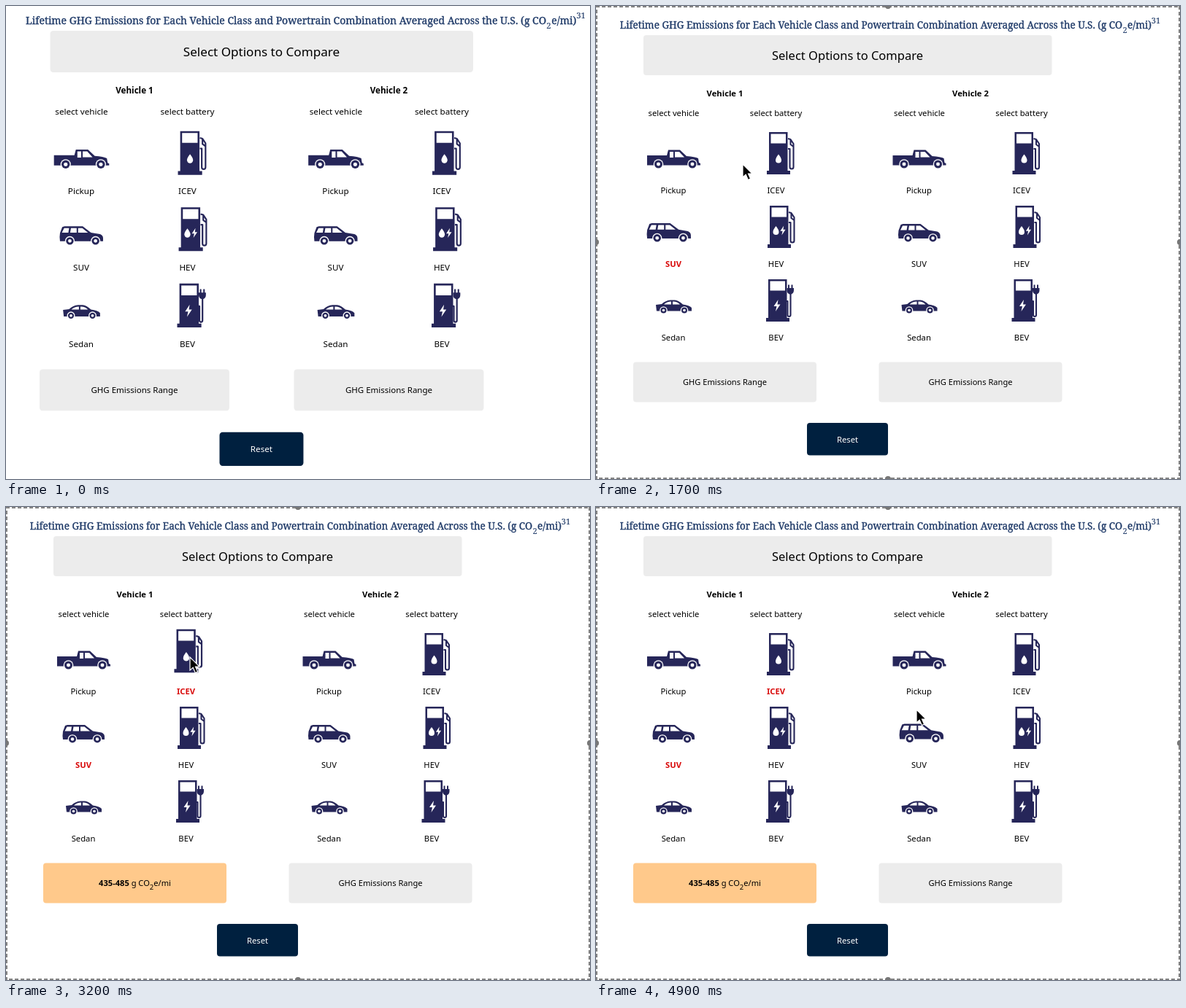
An HTML page that plays this animation: 800 px wide and 649 px high, repeating every 5 s.

```html
<!DOCTYPE html>
<html lang="en">
<head>
<meta charset="utf-8">
<title>Lifetime GHG Emissions</title>
<style>
html, body { margin: 0; width: 100%; height: 100%; overflow: hidden; background: #fff }
svg { display: block }
text { font: 11.25px "Noto Sans", "Open Sans", sans-serif; text-anchor: middle }
.title text { font: 500 13.53px "Noto Serif", serif; fill: #1f3a68; stroke: #1f3a68; stroke-width: .35 }
.title .small { font-size: 11px; stroke-width: .1 }
.heading { font-size: 16.5px }
.bold, .picked { font-weight: 700 }
.picked { fill: #d90b0b }
.range { font-size: 11.1px }
.icon { fill: #262659 }
.hole { fill: #fff }
.line { fill: none; stroke: #262659; stroke-width: 2.1; stroke-linejoin: round }
</style>
</head>
<body>
<svg id="stage" width="800" height="649" viewBox="0 0 800 649"></svg>
<script>
const stage = document.getElementById('stage');
const $ = id => document.getElementById(id);
const text = (x, y, s, cls = '', id = '') => `<text x="${x}" y="${y}" class="${cls}" id="${id}">${s}</text>`;
const box = (x, y, w, h, fill, id = '') =>
  `<rect x="${x}" y="${y}" width="${w}" height="${h}" rx="4" fill="${fill}" id="${id}"/>`;
const hole = d => `<path class="hole" d="${d}"/>`;
const wheel = (x, y, r) => `<circle class="hole" cx="${x}" cy="${y}" r="${r + 1.3}"/>
  <circle cx="${x}" cy="${y}" r="${r}"/><circle class="hole" cx="${x}" cy="${y}" r="${r * .45}"/>`;
const drop = (x, y) => hole(`M${x} ${y - 6.5}q4 5 4 8a4 4 0 0 1-8 0q0-3 4-8z`);
const bolt = (x, y, k = 1) =>
  hole(`M${x + 1.5 * k} ${y - 8 * k}l${-6 * k} ${9 * k}h${4 * k}l${-1.5 * k} ${7 * k}l${6.5 * k} ${-9.5 * k}h${-4 * k}z`);

const hose = '<path class="line" d="M28.5 9l3.5 1 4 6v32a2.5 2.5 0 0 1-5 0V23h-2.5M32 11v6l4 3"/>';
const plug = `<path d="M28 12h9.5v3q0 4-3.5 5.5h-2.5Q28 19 28 15zM29.5 7.5h2v5h-2zM34 7.5h2v5h-2z"/>
  <path class="line" d="M33 19v30a2 2 0 0 1-4 0V30h-2"/>`;
const pump = (symbol, side) =>
  `<path fill-rule="evenodd" d="M2.5 0H28V53H31.5V58H-.5V53H2.5zM5 2.5V15.5H25.5V2.5z"/>${side}${symbol}`;

// Each icon: left, top, width, height and drawing
const icons = {
  Pickup: [70, 197, 73, 26, `<path d="M0 8H27L29 .5H45L54 9Q66 10 70 12L71 18L73 19V21.5H0z"/>
    ${hole('M31 3H36V11H31zM38 3H44L51 10.5H38z')}${wheel(15.5, 20, 5.5)}${wheel(62, 20, 5.5)}`],
  SUV: [77, 299, 58, 25, `<path d="M1 9L4 1L7 0H31L42 8.5L54 10.5Q58 12 58 16V20H1Q0 15 1 9z"/>
    ${hole('M3.5 8.5L6.5 2.5H13L12 8.5zM14.5 8.5L15.5 2.5H23V8.5zM25 8.5V2.5H30.5L38 8.5z')}
    ${wheel(14, 19.5, 5)}${wheel(48, 19.5, 5)}`],
  Sedan: [82, 403, 49, 19, `<path d="M0 7L8 6Q13 1 20 .5H26Q31 1 37 6.5Q46 7.5 49 11V15.5H1z"/>
    ${hole('M11 6.5Q15 2.5 21 2.5V6.5zM23 6.5V2.5Q29 2 33 6.5z')}${wheel(10.5, 14.5, 4)}${wheel(39, 14.5, 4)}`],
  ICEV: [234.5, 173, 37, 58, pump(drop(15.5, 37), hose)],
  HEV: [235.5, 274, 36, 58, pump(drop(11, 34.5) + bolt(20.5, 34, .8), hose)],
  BEV: [233.5, 375, 37, 58, pump(bolt(14.5, 36), plug)]
};
const names = Object.keys(icons);
const GAP = 336.5;

const column = n => {
  const range = text(176.5, 520, 'GHG Emissions Range', 'range', 'range' + n);
  return `<g transform="translate(${n * GAP})">
    ${text(176.5, 123.5, 'Vehicle ' + (n + 1), 'bold')}
    ${text(106.5, 151, 'select vehicle')}${text(246.5, 151, 'select battery')}
    ${box(51, 488.5, 251, 55, '#ececec', 'result' + n)}${range}
    ${names.map((name, i) => `<g class="icon" id="${name + n}">${icons[name][4]}</g>` +
      text(i < 3 ? 106 : 246.5, 256.7 + i % 3 * 101, name, '', 'label' + name + n)).join('')}
  </g>`;
};

stage.innerHTML = `<g id="page">
  <g class="title">${text(377, 31, 'Lifetime GHG Emissions for Each Vehicle Class and Powertrain Combination Averaged Across the U.S. (g CO')}
    ${text(724.5, 37, '2', 'small')}${text(744.5, 31, 'e/mi)')}${text(767, 24, '31', 'small')}</g>
  ${box(65, 40, 559.5, 55, '#ececec')}${text(344.5, 73.5, 'Select Options to Compare', 'heading')}
  ${column(0)}${column(1)}
  ${box(289, 572, 111, 44.5, '#00203f')}<text x="344.5" y="598.5" fill="#fff">Reset</text>
</g>
<g id="overlay">
  <rect width="800" height="649" fill="none" stroke="#858585" stroke-width="4" stroke-dasharray="5 3"/>
  ${[[400, 0], [400, 649], [0, 324], [800, 324]].map(([x, y]) => `<circle cx="${x}" cy="${y}" r="4" fill="#777"/>`).join('')}
  <path id="cursor" d="M0 0V18L4.2 14.3L7.3 21.5L10.6 20.1L7.5 13.1H13z" fill="#000" stroke="#fff" stroke-width="1.2"/>
</g>`;

// time, x, y of the pointer tip
const path = [[100, 150, 190], [600, 128, 212], [900, 134, 283], [1200, 110, 306], [1450, 112, 308],
  [1700, 201, 217], [2000, 244, 198], [2300, 247, 196], [3200, 252, 206], [3500, 262, 296],
  [3900, 407, 402], [4200, 440, 408], [4500, 443, 370], [4900, 439, 278]];
// icon, start, end, shift x, shift y, scale
const hovers = [['Pickup0', 100, 950, -3, 0, 1.03], ['SUV0', 950, 1850, -6.5, -.5, 1.05],
  ['ICEV0', 1900, 3400, -3, -4.5, 1.03], ['HEV0', 3350, 3950, -3, -3, 1.03],
  ['Sedan1', 3920, 4550, -4, 0, 1.05], ['SUV1', 4700, 5200, 3, -1, 1.05]];
const RAMP = 150, SUV_CLICK = 1400, ICEV_CLICK = 2600;
const clamp = v => Math.max(0, Math.min(1, v));

function pointer(t) {
  const i = Math.max(1, path.findIndex(p => p[0] >= t));
  const [t0, x0, y0] = path[i - 1], [t1, x1, y1] = path[i];
  const u = clamp((t - t0) / (t1 - t0)), k = u * u * (3 - 2 * u);
  return [x0 + (x1 - x0) * k, y0 + (y1 - y0) * k];
}

function place(id, amount = 0, dx = 0, dy = 0, scale = 1) {
  const [x, y, w, h] = icons[id.slice(0, -1)], s = 1 + (scale - 1) * amount;
  $(id).setAttribute('transform',
    `translate(${x + dx * amount - w * (s - 1) / 2} ${y + dy * amount - h * (s - 1) / 2}) scale(${s})`);
}

function draw(t) {
  const intro = t < 100;
  $('page').setAttribute('transform', intro ? 'matrix(1.0356 0 0 1.0356 -6.8 -7.5)' : '');
  $('overlay').style.display = intro ? 'none' : '';
  $('cursor').setAttribute('transform', `translate(${pointer(t)})`);
  for (const name of names) for (const n of [0, 1]) place(name + n);
  for (const [id, start, end, ...pose] of hovers)
    if (t > start && t < end) place(id, clamp((t - start) / RAMP) * clamp((end - t) / RAMP), ...pose);
  $('labelSUV0').setAttribute('class', t >= SUV_CLICK ? 'picked' : '');
  const done = t >= ICEV_CLICK;
  $('labelICEV0').setAttribute('class', done ? 'picked' : '');
  $('result0').setAttribute('fill', done ? '#ffc98b' : '#ececec');
  $('range0').innerHTML = done
    ? '<tspan class="bold">435-485</tspan> g CO<tspan dy="5" font-size="9.5">2</tspan><tspan dy="-5">e/mi</tspan>'
    : 'GHG Emissions Range';
}

let last = -1;
function tick() {
  const t = Math.floor(performance.now() % 5000 / 100) * 100;
  if (t !== last) draw(last = t);
  requestAnimationFrame(tick);
}
tick();
</script>
</body>
</html>
```
